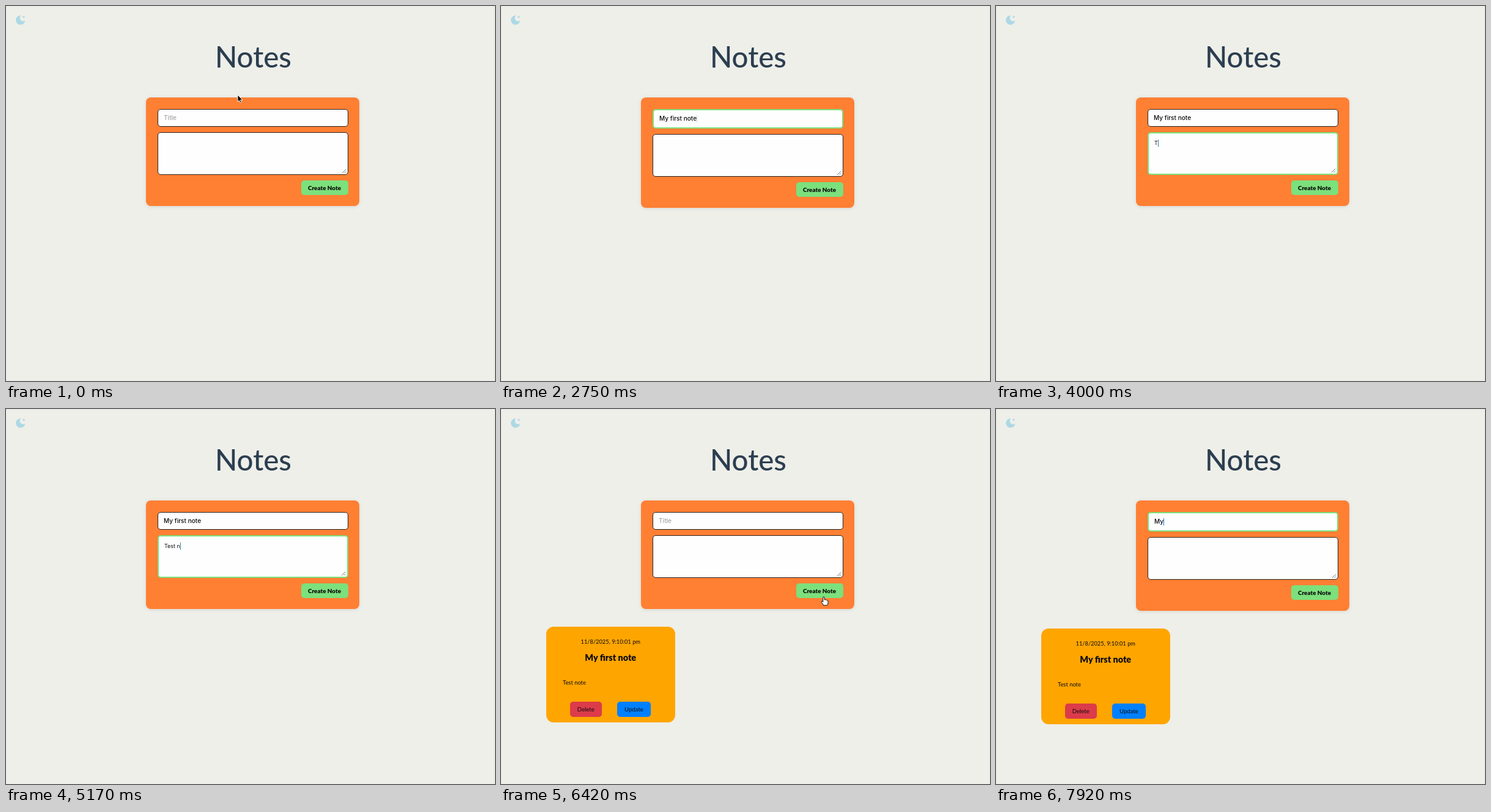
These frames come from a looping animation (800 px wide and 615 px high, 8 s). An HTML page:

```html
<!DOCTYPE html>
<html lang="en">
<head>
<meta charset="utf-8">
<title>Notes</title>
<style>
  * { box-sizing: border-box; }
  html, body { margin: 0; width: 100%; height: 100%; overflow: hidden; background: #eeefe9; }
  body { position: relative; font-family: Lato, "Open Sans", sans-serif; color: #0b0b0b; }
  body::after { content: ""; position: absolute; inset: 0; border: 1px solid #e7e8e4; border-bottom: 0; pointer-events: none; }
  div, svg { position: absolute; }
  div { white-space: pre; }
  h1 { position: absolute; left: 4.5px; top: 53px; width: 800px; margin: 0; text-align: center;
       font-size: 47.5px; line-height: 60px; font-weight: 500; color: #2c3e50; }
  #moon { left: 14px; top: 14px; }
  #form { left: 229px; top: 150px; width: 349px; height: 178px; border-radius: 8px;
          background: #ff7f33; box-shadow: 0 1px 6px rgba(0,0,0,.1); }
  .field { left: 19px; width: 311.5px; background: #fefefe; border: 1px solid #282420; border-radius: 5px; }
  .field.on { border: 2.5px solid #7ce07c; }
  .field div { left: 9px; font-family: Inter, "Liberation Sans", sans-serif; }
  .caret { display: inline-block; position: relative; width: 0; }
  .caret::after { content: ""; position: absolute; left: 0; top: -9.5px; width: 1.4px; height: 12px; background: currentColor; }
  #title { top: 19px; height: 29px; }
  #title.on { height: 31.5px; }
  #title div { top: 0; height: 100%; line-height: 27px; font-size: 10.1px; font-weight: 500; }
  #title .hint { color: #a4a4a4; }
  #body { top: 57px; height: 70px; }
  #body div { top: 9px; line-height: 13px; font-size: 9px; }
  #body svg { right: 2px; bottom: 1.5px; }
  .btn { text-align: center; border-radius: 5px; }
  #create { left: 253.5px; top: 136px; width: 77px; height: 24px; line-height: 24px;
            font-size: 9.9px; font-weight: 900; background: #7ce07c; }
  #card { left: 74px; top: 356.5px; width: 210.5px; height: 157.5px; border-radius: 12px; background: #ffa500; }
  #card .mid { left: 0; width: 100%; text-align: center; }
  #card .btn { top: 123px; height: 25px; line-height: 25px; font-size: 9.6px; }
  #cursor { left: 0; top: 0; overflow: visible; }
</style>
</head>
<body>
<svg id="moon" width="20" height="20" fill="#add8e6">
  <path d="M10.5 1.6A7.6 7.6 0 1 0 17.3 9.8A4.7 4.7 0 1 1 10.5 1.6Z"/>
  <path d="M15 1.2Q15.4 3.2 17.5 3.7Q15.4 4.2 15 6.2Q14.6 4.2 12.5 3.7Q14.6 3.2 15 1.2Z"/>
</svg>
<h1>Notes</h1>
<div id="form">
  <div id="title" class="field"><div></div></div>
  <div id="body" class="field"><div></div>
    <svg width="8" height="8" stroke="#666" stroke-width=".9"><path d="M1 7L7 1M4.5 7L7 4.5"/></svg>
  </div>
  <div id="create" class="btn">Create Note</div>
</div>
<div id="card">
  <div class="mid" style="top:18px;font-size:9.3px;line-height:14px">11/8/2025, 9:10:01 pm</div>
  <div class="mid" style="top:41px;font-size:14.4px;line-height:20px;font-weight:900">My first note</div>
  <div style="left:27px;top:85.5px;font-size:9.4px;line-height:14px">Test note</div>
  <div class="btn" style="left:38.5px;width:52.5px;background:#dc3b4a">Delete</div>
  <div class="btn" style="left:116px;width:55px;background:#0080ff">Update</div>
</div>
<svg id="cursor" width="1" height="1" stroke-linejoin="round" stroke-linecap="round">
  <path id="arrow" fill="#000" stroke="#fff" stroke-width=".9"
    d="M0 0V11L2.5 8.8L4.2 12.7L6.1 11.9L4.4 8.1H7.8Z"/>
  <g id="beam" fill="none">
    <path stroke="#fff" stroke-width="2" d="M-2.5-6.5Q0-6.5 0-5V5Q0 6.5-2.5 6.5M2.5-6.5Q0-6.5 0-5M0 5Q0 6.5 2.5 6.5"/>
    <path stroke="#111" d="M-2.5-6.5Q0-6.5 0-5V5Q0 6.5-2.5 6.5M2.5-6.5Q0-6.5 0-5M0 5Q0 6.5 2.5 6.5"/>
  </g>
  <path id="hand" fill="#fff" stroke="#111" stroke-width="1"
    d="M-1.2 8V1Q-1.2 0 0 0T1.2 1V5Q2.7 4 3.5 5.3Q4.8 4.6 5.4 5.8Q7 5.4 7 7V10Q6.8 12 5.8 14H-.2Q-1.2 11.8-3.6 9.2Q-4.5 7.7-3.2 7.2Q-2.2 7.1-1.2 8Z"/>
</svg>
<script>
const $ = id => document.getElementById(id);
const STEP = 1000 / 12, LOOP = 8000;

// [step, focused field, title, body, card shown]
const states = [
  [0, "", "", ""],
  [7, "title", "", ""],
  [10, "title", "M", ""],
  [12, "title", "My", ""],
  [15, "title", "My ", ""],
  [16, "title", "My f", ""],
  [18, "title", "My fir", ""],
  [21, "title", "My firs", ""],
  [22, "title", "My first", ""],
  [25, "title", "My first no", ""],
  [26, "title", "My first note", ""],
  [43, "body", "My first note", ""],
  [48, "body", "My first note", "T"],
  [49, "body", "My first note", "Te"],
  [51, "body", "My first note", "Tes"],
  [53, "body", "My first note", "Test "],
  [62, "body", "My first note", "Test n"],
  [63, "body", "My first note", "Test no"],
  [64, "body", "My first note", "Test note"],
  [75, "", "", "", true],
  [89, "title", "", "", true],
  [93, "title", "M", "", true],
  [95, "title", "My", "", true]
];

// pointer moves: [first step, last step, from, to]
const moves = [
  [0, 7, [379, 146], [380, 189]],
  [36, 43, [380, 189], [386, 240]],
  [67, 72, [386, 240], [520, 309]],
  [72, 77, [520, 309], [528, 308]],
  [80, 89, [528, 308], [396, 184]]
];
const hidden = [[10, 36], [48, 68], [93, 96]];

const ease = p => p * p * (3 - 2 * p);

function pointerAt(s) {
  const [a, b, from, to] = moves.filter(m => s >= m[0]).pop();
  const p = ease(Math.min(1, (s - a) / (b - a)));
  return from.map((v, i) => v + (to[i] - v) * p);
}

function pointerKind(x, y, shift) {
  const within = (l, t, r, b) => x >= l && x <= r && y >= t && y <= b;
  if (within(483, 286 + shift, 560, 310 + shift)) return "hand";
  if (within(248, 169, 560, 198 + shift) || within(248, 207 + shift, 560, 277 + shift)) return "beam";
  return "arrow";
}

function caretAlpha(age) {
  const a = age % 12;
  return a < 6 ? 1 : a < 9 ? .3 : 0;
}

function fill(id, text, focused, age, color) {
  const field = $(id), line = field.firstElementChild;
  field.classList.toggle("on", focused);
  line.textContent = text;
  if (focused) {
    const caret = document.createElement("span");
    caret.className = "caret";
    caret.style.color = color;
    caret.style.opacity = caretAlpha(age);
    line.append(caret);
  }
  return line;
}

function draw(s) {
  const [start, focus, title, body, card] = states.filter(r => s >= r[0]).pop();
  const age = s - start, onTitle = focus === "title", shift = onTitle ? 3 : 0;

  const line = fill("title", title || "Title", onTitle, age, card ? "#0a7cff" : "#2f8099");
  line.classList.toggle("hint", !title);
  if (!title && onTitle) line.prepend(line.lastChild);
  fill("body", body, focus === "body", age, "#2f8099");

  $("form").style.height = 178 + shift + "px";
  for (const id of ["body", "create", "card"])
    $(id).style.transform = `translateY(${shift}px)`;
  $("card").style.display = card ? "block" : "none";

  const [x, y] = pointerAt(s), kind = pointerKind(x, y, shift);
  $("cursor").style.display = hidden.some(([a, b]) => s >= a && s < b) ? "none" : "block";
  $("cursor").style.transform = `translate(${x}px, ${y}px)`;
  for (const id of ["arrow", "beam", "hand"])
    $(id).style.display = id === kind ? "inline" : "none";
}

let last = -1;
const origin = performance.now();
function tick() {
  const t = (performance.now() - origin) % LOOP;
  const s = Math.floor((t + 4) / STEP) % 96;
  if (s !== last) draw(last = s);
  requestAnimationFrame(tick);
}
draw(0);
tick();
</script>
</body>
</html>
```
